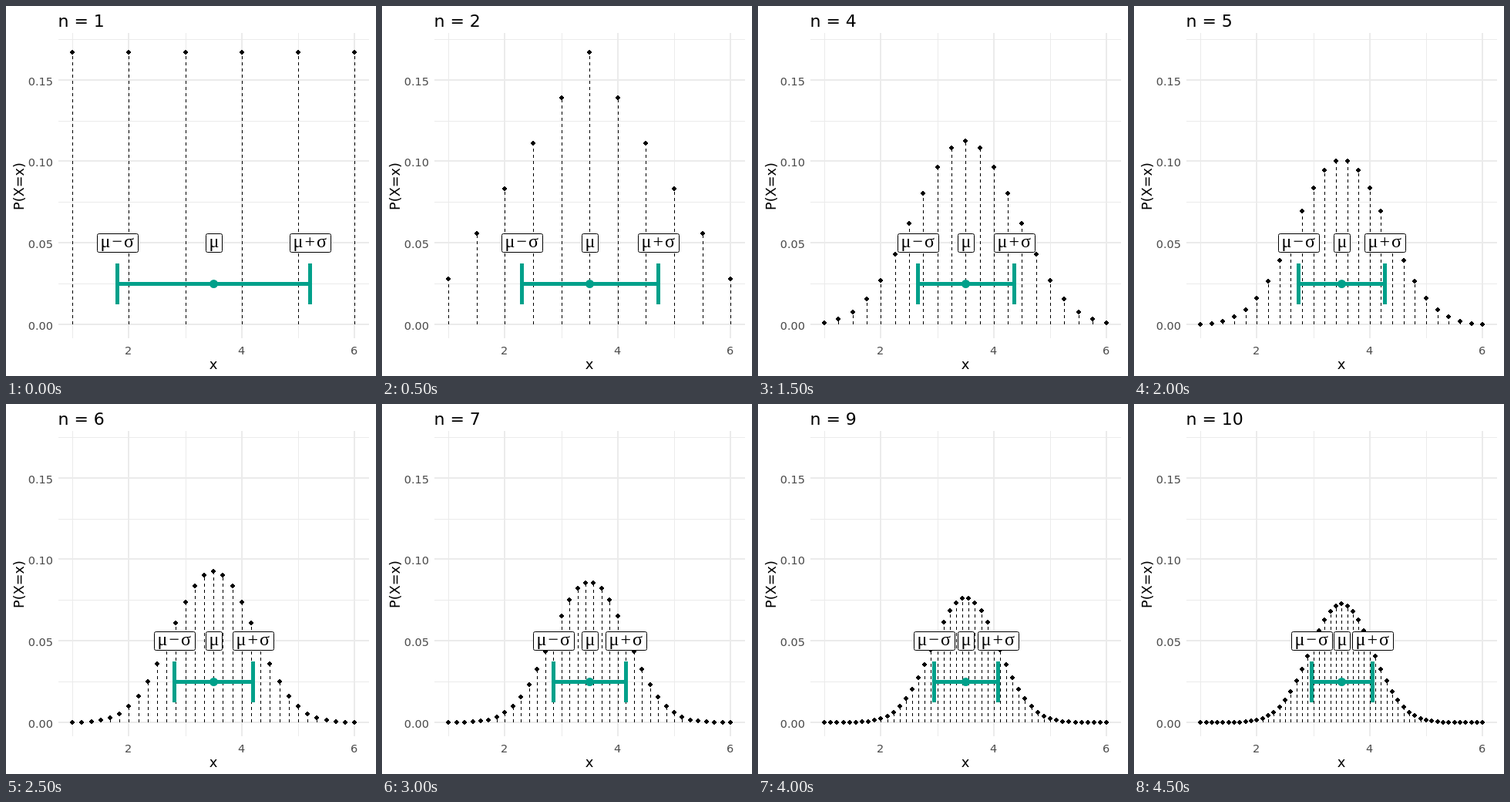
Animation, 480 px wide and 480 px high, one loop 5000 ms. Source, as an HTML page with a canvas:

```html
<!DOCTYPE html>
<html lang="en">
<head>
<meta charset="utf-8">
<title>Mean of n dice</title>
<style>
  html, body { margin: 0; width: 100%; height: 100%; overflow: hidden; background: #fff; }
  canvas { display: block; }
</style>
</head>
<body>
<canvas id="stage" width="480" height="480"></canvas>
<script>
const ctx = document.getElementById("stage").getContext("2d");
const SANS = '"DejaVu Sans", sans-serif';
const SERIF = '"Liberation Serif", serif';
const GRID = "#ebebeb", TEAL = "#00a08a";
const PANEL = { left: 68, right: 471, top: 35, bottom: 431 };
const STEP_MS = 500, MAX_DICE = 10;

// Data to whole pixels; odd-width lines add half a pixel to stay sharp.
const px = x => Math.round(269.2 + 73.2 * (x - 3.5));
const py = p => Math.round(413 - 2115.5 * p);

// Probability of each total of n dice, from n to 6n.
function diceTotals(n) {
  let probs = [1];
  for (let die = 0; die < n; die++) {
    const next = new Array(probs.length + 5).fill(0);
    probs.forEach((p, i) => { for (let k = 0; k < 6; k++) next[i + k] += p / 6; });
    probs = next;
  }
  return probs;
}

function line(x1, y1, x2, y2, color, width) {
  ctx.strokeStyle = color;
  ctx.lineWidth = width;
  ctx.beginPath();
  ctx.moveTo(x1, y1);
  ctx.lineTo(x2, y2);
  ctx.stroke();
}

// A stepped diamond, six pixels across.
function marker(x, y) {
  ctx.fillStyle = "#000";
  for (let k = 1; k <= 3; k++) ctx.fillRect(x - k, y - 4 + k, 2 * k, 8 - 2 * k);
}

function text(str, x, y, size, align = "center", color = "#000", family = SANS) {
  ctx.font = `${size}px ${family}`;
  ctx.textAlign = align;
  ctx.fillStyle = color;
  ctx.fillText(str, x, y);
}

function drawGrid() {
  const vertical = (x, w) => line(x, PANEL.top, x, PANEL.bottom, GRID, w);
  const horizontal = (y, w) => line(PANEL.left, y, PANEL.right, y, GRID, w);
  for (const x of [1, 3, 5]) vertical(px(x) + 0.5, 1);
  for (let i = 1; i < 8; i += 2) horizontal(py(i * 0.025) + 0.5, 1);
  for (const x of [2, 4, 6]) {
    vertical(px(x), 2);
    text(x, px(x) - 0.5, 451.5, 14.5, "center", "#4d4d4d");
  }
  for (let i = 0; i < 4; i++) {
    const y = py(i * 0.05);
    horizontal(y, 2);
    text((i * 0.05).toFixed(2), 61, y + 6.5, 14.5, "right", "#4d4d4d");
  }
}

function drawAxisTitles() {
  text("x", 269, 471, 18);
  ctx.save();
  ctx.translate(23, 234);
  ctx.rotate(-Math.PI / 2);
  text("P(X=x)", 0, 0, 17.7);
  ctx.restore();
}

function drawDistribution(n) {
  const points = diceTotals(n).map((p, i) => [px(1 + i / n), py(p)]);
  ctx.setLineDash([4, 4]);
  for (const [x, y] of points) line(x + 0.5, py(0), x + 0.5, y, "#000", 1);
  ctx.setLineDash([]);
  for (const [x, y] of points) marker(x, y);
}

function drawInterval(left, mid, right) {
  const y = py(0.025) + 0.5;
  line(left, y, right, y, TEAL, 5);
  for (const x of [left, right]) line(x, y - 26.5, x, y + 26.5, TEAL, 5);
  ctx.fillStyle = TEAL;
  ctx.beginPath();
  ctx.arc(mid, y, 5.5, 0, 2 * Math.PI);
  ctx.fill();
}

function drawLabel(x, operator) {
  const width = operator ? 53 : 21;
  ctx.beginPath();
  ctx.roundRect(x - Math.floor(width / 2), 295.5, width, 24, 2);
  ctx.fillStyle = "#fff";
  ctx.fill();
  ctx.strokeStyle = "#000";
  ctx.lineWidth = 1;
  ctx.stroke();
  const glyph = (char, dx) => text(char, x + dx, 313, 24, "center", "#000", SERIF);
  glyph("μ", operator ? -15.5 : 0.5);
  if (operator) {
    glyph(operator, -0.2);
    glyph("σ", 15);
  }
}

function draw(n) {
  const sigma = Math.sqrt(35 / 12 / n);
  const [left, mid, right] = [3.5 - sigma, 3.5, 3.5 + sigma].map(x => px(x) + 0.5);
  ctx.fillStyle = "#fff";
  ctx.fillRect(0, 0, 480, 480);
  drawGrid();
  drawAxisTitles();
  text(`n = ${n}`, 67.5, 26.5, 22, "left");
  drawDistribution(n);
  drawInterval(left, mid, right);
  drawLabel(left, "−");
  drawLabel(mid);
  drawLabel(right, "+");
}

const start = performance.now();
function frame() {
  const elapsed = performance.now() - start;
  draw(1 + Math.floor(elapsed / STEP_MS) % MAX_DICE);
  requestAnimationFrame(frame);
}
frame();
</script>
</body>
</html>
```
